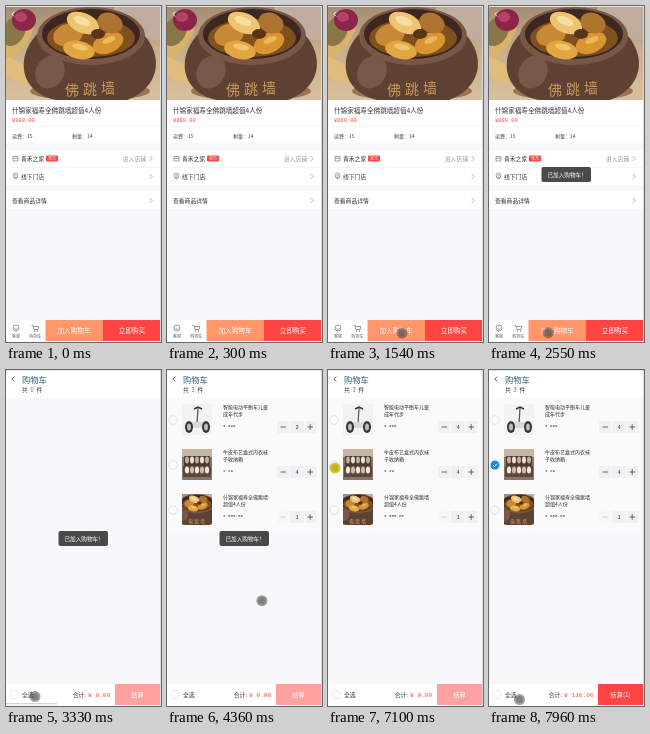
These frames come from a looping animation (155 px wide and 336 px high, 8000 ms). An HTML page with a canvas:

```html
<!DOCTYPE html>
<html lang="zh">
<head>
<meta charset="utf-8">
<style>
html, body { margin: 0; width: 100%; height: 100%; overflow: hidden; background: #fff; }
canvas { display: block; width: 155px; height: 336px; }
</style>
</head>
<body>
<canvas id="stage"></canvas>
<script>
const W = 155, H = 336, LOOP = 8000;
const SANS = '"Noto Sans CJK SC", "Noto Sans CJK", sans-serif';
const MONO = '"Liberation Mono", monospace';
const canvas = document.getElementById('stage');
const c = canvas.getContext('2d');
const dpr = window.devicePixelRatio || 1;
canvas.width = W * dpr;
canvas.height = H * dpr;

function rect(x, y, w, h, color) {
  c.fillStyle = color;
  c.fillRect(x, y, w, h);
}

function round(x, y, w, h, r, color) {
  c.fillStyle = color;
  c.beginPath();
  c.roundRect(x, y, w, h, r);
  c.fill();
}

function oval(x, y, rx, ry, color, turn = 0) {
  c.fillStyle = color;
  c.beginPath();
  c.ellipse(x, y, rx, ry, turn, 0, Math.PI * 2);
  c.fill();
}

function line(points, color, width = 0.7) {
  c.strokeStyle = color;
  c.lineWidth = width;
  c.beginPath();
  for (let i = 0; i < points.length; i += 2) c.lineTo(points[i], points[i + 1]);
  c.stroke();
}

function ring(x, y, r, color, width = 0.6) {
  c.strokeStyle = color;
  c.lineWidth = width;
  c.beginPath();
  c.arc(x, y, r, 0, Math.PI * 2);
  c.stroke();
}

// y is the vertical middle of the line
function text(s, x, y, size, color, align = 'left', font = SANS) {
  c.font = `${size}px ${font}`;
  c.textAlign = align;
  c.textBaseline = 'alphabetic';
  c.fillStyle = color;
  c.fillText(s, x, y + size * 0.37);
}

function chevron(x, y, dir, color, s = 2.4) {
  line([x - dir * s / 2, y - s, x + dir * s / 2, y, x - dir * s / 2, y + s], color, 0.8);
}

function clipped(x, y, w, h, draw) {
  c.save();
  c.beginPath();
  c.rect(x, y, w, h);
  c.clip();
  c.translate(x, y);
  draw();
  c.restore();
}

function stew() {
  const cloth = c.createLinearGradient(0, 0, 0, 93);
  cloth.addColorStop(0, '#a58d73');
  cloth.addColorStop(0.5, '#c9b190');
  cloth.addColorStop(1, '#d8c09c');
  rect(0, 0, 154, 93, cloth);
  oval(140, 12, 34, 18, '#bfae9d', 0.4);
  oval(10, 35, 27, 9, '#d9b26b', -0.9);
  oval(8, 63, 24, 9, '#e0bd7d', 0.5);
  oval(8, 24, 11, 16, '#8a7748', 0.5);
  oval(18, 13, 12, 11, '#8d2548');
  oval(15, 10, 6, 5, '#b44368');
  oval(84, 84, 60, 10, '#9b7350');
  c.fillStyle = '#5f4134';
  c.beginPath();
  c.moveTo(31, 27);
  c.bezierCurveTo(8, 52, 14, 88, 55, 94);
  c.lineTo(118, 94);
  c.bezierCurveTo(156, 82, 158, 46, 135, 25);
  c.fill();
  oval(44, 65, 14, 17, '#78584a', 0.5);
  oval(85, 29, 54, 29, '#795747');
  oval(85, 27, 49, 25, '#3d271f');
  oval(85, 31, 44, 19, '#80511f');
  oval(62, 28, 15, 11, '#c78935', -0.3);
  oval(73, 43, 16, 9, '#e2a743', 0.2);
  oval(102, 36, 16, 10, '#d99531', -0.4);
  oval(77, 16, 17, 10, '#edc472', 0.4);
  oval(104, 16, 13, 10, '#ad7430', 0.4);
  oval(76, 14, 9, 4, '#f7dfa3', 0.4);
  oval(74, 40, 8, 3, '#f2c76c', 0.2);
  oval(103, 33, 7, 3, '#edb75b', -0.4);
  oval(92, 27, 7, 5, '#573418');
  [...'佛跳墙'].forEach((ch, i) => text(ch, 66 + i * 18, 83 - i, 14, '#c99a5b', 'center'));
}

function scooter() {
  rect(0, 0, 30, 31, '#f2f2f1');
  line([16, 4, 15, 20], '#555', 1.3);
  line([12, 5, 16, 3, 20, 5], '#333', 1.4);
  round(9, 18, 14, 6, 2, '#d7d9dc');
  oval(7, 23, 4, 6, '#34363a');
  oval(24, 23, 4, 6, '#34363a');
  oval(7, 23, 2, 3.5, '#b8bbc0');
  oval(24, 23, 2, 3.5, '#b8bbc0');
}

function boxes() {
  rect(0, 0, 30, 31, '#8a7667');
  rect(0, 0, 30, 8, '#c6b6a6');
  round(2, 7, 26, 10, 1, '#4a3a33');
  round(1, 17, 28, 11, 1, '#5b473d');
  for (let i = 0; i < 5; i++) {
    oval(5 + i * 5, 11, 2, 3.4, i % 2 ? '#e9dfd2' : '#c4ad99');
    oval(5 + i * 5, 21, 2.1, 3.6, i % 2 ? '#cfbaa8' : '#f0e8de');
  }
}

function thumbStew() {
  c.scale(0.333, 0.333);
  c.translate(-40, 0);
  stew();
}

function productPage(t) {
  rect(0, 0, W, H, '#f7f8fa');
  clipped(0, 1, 154, 93, stew);
  chevron(7, 8, -1, '#fff');
  rect(0, 94, W, 43, '#fff');
  text('什锦家福寿全佛跳墙超值4人份', 6, 105, 6.6, '#323233');
  text('¥888.00', 6, 114, 5.4, '#f44', 'left', MONO);
  rect(0, 120, W, 0.5, '#ebedf0');
  text('运费：15', 6, 130, 5, '#444');
  text('剩量：14', 66, 130, 5, '#444');

  rect(0, 144, W, 35, '#fff');
  line([7, 150.5, 12, 150.5, 12, 155, 7, 155, 7, 150.5], '#666', 0.6);
  line([7, 152.3, 12, 152.3], '#666', 0.6);
  text('青禾之家', 15, 152.5, 5.8, '#323233');
  round(40, 149.5, 12, 6, 1, '#f44');
  text('官方', 46, 152.5, 4.1, '#fff', 'center');
  text('进入店铺', 140, 152.5, 5.8, '#969799', 'right');
  chevron(145, 152.5, 1, '#969799');
  rect(6, 161, 149, 0.5, '#ebedf0');
  ring(9.5, 169.3, 2.4, '#666');
  ring(9.5, 169.3, 0.8, '#666', 0.5);
  line([7.6, 171, 9.5, 173.3, 11.4, 171], '#666', 0.6);
  text('线下门店', 15, 170.5, 5.8, '#323233');
  chevron(145, 170.5, 1, '#969799');

  rect(0, 185, W, 18, '#fff');
  text('查看商品详情', 6, 194.5, 5.8, '#323233');
  chevron(145, 194.5, 1, '#969799');

  rect(0, 314, W, 22, '#fff');
  ring(10, 322, 3, '#555');
  line([8.5, 322.6, 10, 323.4, 11.5, 322.6], '#555', 0.6);
  line([25.5, 319.5, 27, 319.5, 28, 323.5, 32, 323.5, 32.8, 320.5, 27.5, 320.5], '#555', 0.6);
  oval(28.5, 325, 0.6, 0.6, '#555');
  oval(31.5, 325, 0.6, 0.6, '#555');
  text('客服', 10, 330, 4.1, '#646566', 'center');
  text('购物车', 29.5, 330, 4.1, '#646566', 'center');
  rect(39.5, 314, 57.5, 21, '#ff976a');
  if (t >= 1390 && t < 1540) rect(39.5, 314, 57.5, 21, 'rgba(0,0,0,.1)');
  rect(97, 314, 58, 21, '#f44');
  text('加入购物车', 68, 324.7, 6.6, '#fff', 'center');
  text('立即购买', 126, 324.7, 6.6, '#fff', 'center');
}

function radio(x, y, on) {
  if (!on) return ring(x, y, 4.3, '#d5d6da');
  oval(x, y, 4.5, 4.5, '#1989fa');
  line([x - 2, y, x - 0.6, y + 1.6, x + 2.2, y - 1.5], '#fff', 0.9);
}

function stepper(y, n) {
  const dim = n > 1 ? '#444' : '#c8c9cc';
  round(110, y - 6, 12, 12, 1, n > 1 ? '#f0f1f3' : '#f6f7f8');
  rect(123, y - 6, 14, 12, '#f0f1f3');
  round(138, y - 6, 11.5, 12, 1, '#f0f1f3');
  line([113.5, y, 119, y], dim, 0.8);
  line([140.5, y, 146, y], '#444', 0.8);
  line([143.2, y - 2.8, 143.2, y + 2.8], '#444', 0.8);
  text(String(n), 130, y, 5.4, '#323233', 'center', MONO);
}

const goods = [
  { name: ['智能电动平衡车儿童', '成年代步'], price: '999', pic: scooter },
  { name: ['牛皮布艺盒式内衣袜', '子收纳箱'], price: '29', pic: boxes },
  { name: ['什锦家福寿全佛跳墙', '超值4人份'], price: '888.00', pic: thumbStew }
];

function cartPage(t) {
  const loaded = t >= 3800;
  const paid = t >= 7330;
  const counts = [t < 5550 ? 2 : t < 5840 ? 3 : 4, 4, 1];
  rect(0, 0, W, H, '#f7f8fa');
  rect(0, 0, W, 28, '#fff');
  chevron(7, 9, -1, '#323233');
  text('购物车', 16, 10, 8.3, '#35607a');
  text('共', 16, 20, 5.8, '#323233');
  text(loaded ? '3' : '0', 26.2, 20, 5.8, '#2c8058', 'center');
  text('件', 30.5, 20, 5.8, '#323233');

  if (loaded) {
    rect(0, 28, W, 132, '#fafafa');
    goods.forEach((g, i) => {
      const y = 34 + i * 45;
      radio(6, y + 16, i === 1 && t >= 7250);
      clipped(15, y, 30, 31, g.pic);
      g.name.forEach((s, k) => text(s, 56, y + 3 + k * 6.7, 5, '#323233'));
      text('¥ ' + g.price, 56, y + 21, 4.2, '#323233', 'left', MONO);
      stepper(y + 23, counts[i]);
    });
  }

  rect(0, 314, W, 22, '#fff');
  radio(8, 324.5, false);
  text('全选', 16, 324.5, 5.8, '#323233');
  const total = paid ? '¥ 116.00' : '¥ 0.00';
  const left = paid ? 75 : 82;
  text('合计:', left - 2, 324.7, 5.8, '#323233', 'right');
  text(total, left, 324.7, 6.2, '#f44', 'left', MONO);
  rect(109, 314, 46, 21, paid ? '#f44' : '#ffa1a1');
  text(paid ? '结算(1)' : '结算', 131.5, 324.7, 6.2, '#fff', 'center');
  if (t < 3650) {
    rect(0, 333, 51, 3, '#f1f1f1');
    rect(0, 333, 51, 0.6, '#c4c4c4');
  }
}

function toast(t) {
  const fadeIn = (t - 1730) / 280;
  const fadeOut = (4930 - t) / 260;
  c.globalAlpha = Math.max(0, Math.min(1, fadeIn, fadeOut));
  round(52.5, 161, 49.5, 15, 2, 'rgba(50,50,51,.88)');
  text('已加入购物车！', 58.5, 168.5, 5.6, '#fff');
  c.globalAlpha = 1;
}

// Each stroke: time, x, y
const strokes = [
  [[840, 76, 329], [1240, 76, 328], [1390, 74, 327], [2400, 74, 327], [2860, 29, 326.5], [3950, 29, 326.5], [4630, 138, 168], [4980, 144, 84]],
  [[5210, 142, 50], [5400, 142, 50], [5700, 146, 59], [6000, 146, 59], [6580, 8, 60]],
  [[6720, 11, 105], [7100, 7, 98], [7500, 7, 98], [7960, 30.5, 329.5], [8000, 30.5, 329.5]]
];

function pointer(t) {
  const path = strokes.find(p => t >= p[0][0] && t < p[p.length - 1][0]);
  if (!path) return;
  const i = path.findIndex(p => p[0] > t);
  const [t0, x0, y0] = path[i - 1], [t1, x1, y1] = path[i];
  const k = (t - t0) / (t1 - t0);
  const x = x0 + (x1 - x0) * k, y = y0 + (y1 - y0) * k;
  const lit = t >= 6720 && t < 7500;
  oval(x, y, 5.5, 5.5, lit ? 'rgba(205,190,20,.85)' : 'rgba(70,65,65,.5)');
  oval(x, y, 3.6, 3.6, lit ? 'rgba(180,160,0,.5)' : 'rgba(70,65,65,.35)');
}

function frame(now) {
  const t = now % LOOP;
  c.setTransform(dpr, 0, 0, dpr, 0, 0);
  if (t < 3180) productPage(t);
  else cartPage(t);
  toast(t);
  pointer(t);
  rect(0, 0, W, 1, '#e4e4e4');
  rect(154, 0, 1, H, '#dcdcdc');
  requestAnimationFrame(frame);
}

const start = performance.now();
frame(0);
function frameTime() { return performance.now() - start; }
</script>
</body>
</html>
```
